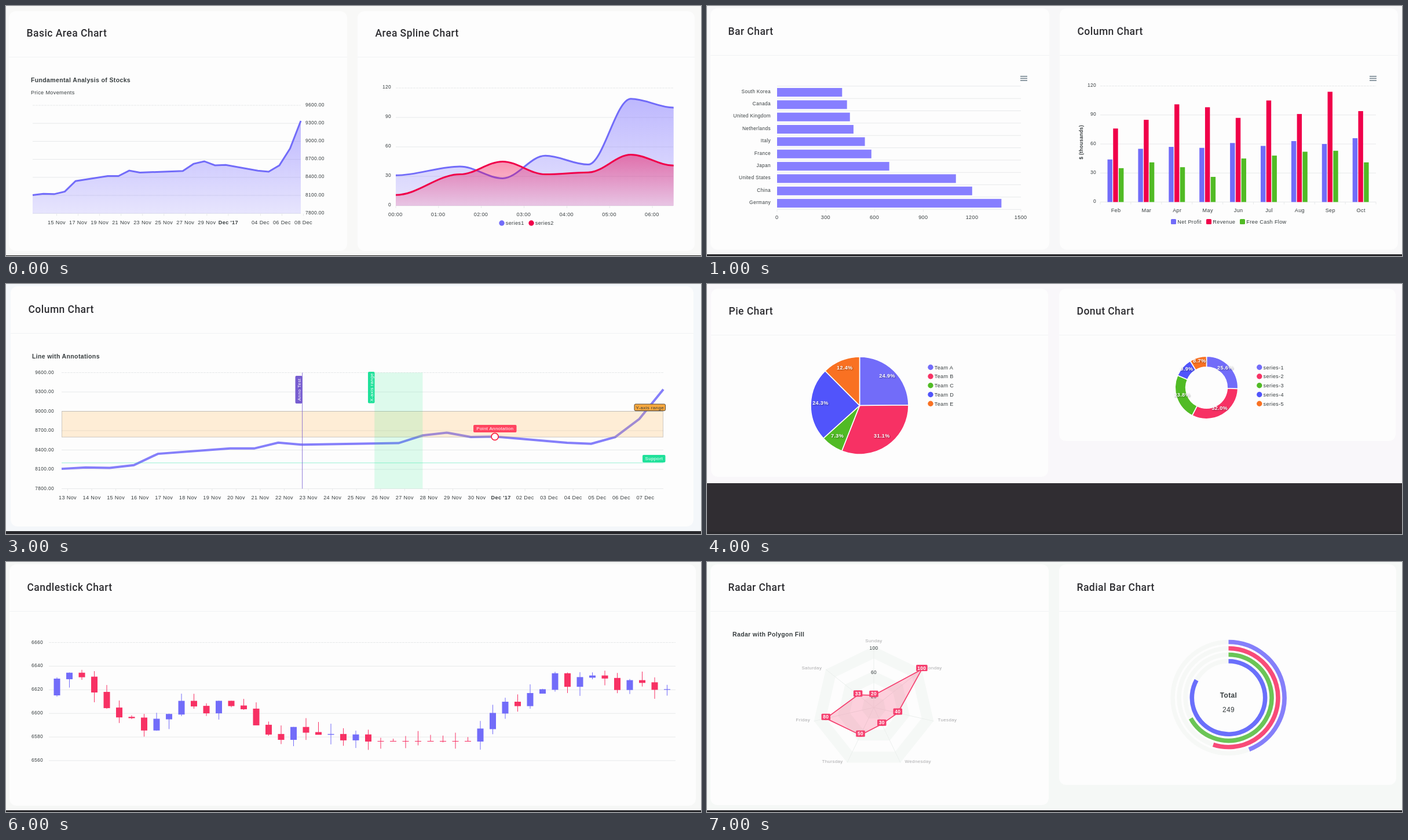
Animation of 1200 by 433 pixels, one loop 8000 ms. Source, as an HTML page:

```html
<!DOCTYPE html>
<html lang="en">
<head>
<meta charset="utf-8">
<title>Chart gallery</title>
<style>
html, body { margin: 0; width: 100%; height: 100%; overflow: hidden; background: #f8f8f7; }
svg { display: block; width: 100%; height: 100%; }
text { font: 8.4px "Liberation Sans", Arial, sans-serif; letter-spacing: .36px; fill: #373d3f; white-space: pre; }
.x { font-size: 9.1px; }
.s { font-size: 8px; }
.b { font-weight: 700; }
.m { text-anchor: middle; }
.e { text-anchor: end; }
.w { fill: #fff; }
.mute { fill: #a9a9ab; }
.sub { font-size: 10.5px; font-weight: 700; }
.big { font-size: 11.9px; }
.title { font: 500 17.5px Roboto, sans-serif; letter-spacing: .45px; fill: #2d2d31; }
.glow { filter: drop-shadow(1px 1px 1px rgba(0, 0, 0, .45)); }
.slide { visibility: hidden; animation: show 8s step-end infinite; animation-delay: calc((var(--i) - 8) * 1s); }
@keyframes show { 0% { visibility: visible; } 12.5%, 100% { visibility: hidden; } }
</style>
</head>
<body>
<svg id="stage" viewBox="0 0 1200 433" preserveAspectRatio="none">
  <defs>
    <linearGradient id="violetFade" x2="0" y2="1">
      <stop stop-color="#7366ff" stop-opacity=".46"/><stop offset="1" stop-color="#7366ff" stop-opacity=".16"/>
    </linearGradient>
    <linearGradient id="redFade" x2="0" y2="1">
      <stop stop-color="#f0004a" stop-opacity=".46"/><stop offset="1" stop-color="#f0004a" stop-opacity=".14"/>
    </linearGradient>
  </defs>
</svg>
<script>
const VIOLET = '#726cf9', RED = '#f0004a', PINK = '#f73164', GREEN = '#51bb25', BLUE = '#5154fb', ORANGE = '#f97122';
const GRID = '#e7e9ea', DARK = '#27272b';

// SVG helpers
const text = (x, y, s, cls = '', extra = '') => `<text x="${x}" y="${y}" class="${cls}" ${extra}>${s}</text>`;
const rect = (x, y, w, h, fill, extra = '') => `<rect x="${x}" y="${y}" width="${w}" height="${h}" fill="${fill}" ${extra}/>`;
const line = (x1, y1, x2, y2, color = GRID, w = 1, extra = '') =>
  `<path d="M${x1} ${y1}L${x2} ${y2}" stroke="${color}" stroke-width="${w}" ${extra}/>`;
const path = (d, fill, stroke = 'none', w = 0, extra = '') =>
  `<path d="${d}" fill="${fill}" stroke="${stroke}" stroke-width="${w}" ${extra}/>`;
const circle = (x, y, r, fill, extra = '') => `<circle cx="${x}" cy="${y}" r="${r}" fill="${fill}" ${extra}/>`;
const upright = (x, y, s, cls) => text(0, 3, s, cls + ' m', `transform="translate(${x} ${y}) rotate(-90)"`);
const each = (list, fn) => list.map(fn).join('');
const range = n => [...Array(n).keys()];
const polar = (cx, cy, r, turn) => [cx + r * Math.sin(turn * 2 * Math.PI), cy - r * Math.cos(turn * 2 * Math.PI)];
const straight = pts => 'M' + pts.map(p => p.join(' ')).join('L');
const smooth = pts => pts.reduce((d, [x, y], i) => {
  if (!i) return `M${x} ${y}`;
  const [px, py] = pts[i - 1], k = (x - px) * .35;
  return `${d}C${px + k} ${py} ${x - k} ${y} ${x} ${y}`;
}, '');
const closeDown = (d, pts, base) => `${d}L${pts.at(-1)[0]} ${base}L${pts[0][0]} ${base}Z`;
const random = seed => () => (seed = seed * 16807 % 2147483647) / 2147483647;

// Shared page parts
const card = (x, y, w, h, title, divider, base) =>
  rect(x, y, w, h, '#fdfdfd', 'rx="12"') + line(x, divider, x + w, divider, '#f1f3f4') + text(x + 30.5, base, title, 'title');
const page = (bg, foot) => rect(0, 0, 1200, 433, bg) + rect(0, foot, 1200, 433 - foot, DARK);
const rows = (x1, x2, top, step, labels, lx, cls, dy) => each(labels, (s, i) => {
  const y = top + i * step;
  return line(x1, y, x2, y, GRID, 1, i ? '' : 'stroke-dasharray="4 1"') + text(lx, y + dy, s, cls);
});
const ticks = (xs, y) => each(xs, x => line(x, y, x, y + 4));
const menu = (x, y) => each([0, 3.6, 7.2], d => line(x, y + d, x + 12, y + d, '#74848f', 1.6));
const dotLegend = (items, y) => each(items, ([x, s, c]) => circle(x, y, 4.7, c) + text(x + 6.8, y + 3.2, s, 'x'));
const squareLegend = (items, y) => each(items, ([x, s, c]) => rect(x, y, 9, 9, c, 'rx="1.5"') + text(x + 11.3, y + 7.6, s, 'x'));
const decimals = ['9600.00', '9300.00', '9000.00', '8700.00', '8400.00', '8100.00', '7800.00'];

// Prices by day, counted from 13 Nov
const prices = [[0, 8107.85], [1, 8128], [2, 8122.9], [3, 8165.5], [4, 8340.7], [7, 8423.7], [8, 8423.5], [9, 8514.3],
  [10, 8481.85], [14, 8506.9], [15, 8626.2], [16, 8668.95], [17, 8602.3], [18, 8607.55], [21, 8512.9], [22, 8496.25],
  [23, 8600.65], [24, 8881.1], [25, 9340.85]];
const pricePoints = (x, step, base, scale) => prices.map(([d, p]) => [x + d * step, base - (p - 7800) * scale]);
const two = n => String(n).padStart(2, '0');
const dayName = d => d === 18 ? "Dec '17" : d < 18 ? `${13 + d} Nov` : `${two(d - 17)} Dec`;
const dayAxis = (days, x, step, y, base) => each(days, d =>
  text(x + d * step, base, dayName(d), 'x m' + (d === 18 ? ' b' : ''))) + ticks(days.map(d => x + d * step), y);

function areaSlide() {
  const pts = pricePoints(46, 18.52, 359.5, .1042), d = straight(pts);
  const spline = (values, color, fill) => {
    const p = values.map((v, i) => [673 + 73.8 * (i && i + .5), 346 - v * 1.7]), s = smooth(p);
    return path(closeDown(s, p, 346), `url(#${fill})`) + path(s, 'none', color, 3);
  };
  return rect(0, 0, 1200, 433, '#f8f8f7') + rect(0, 432, 1200, 1, '#111') +
    card(5, 9, 584, 415, 'Basic Area Chart', 88.5, 53) + card(607, 9, 582, 415, 'Area Spline Chart', 88.5, 53) +
    text(43, 132, 'Fundamental Analysis of Stocks', 'sub') + text(43, 153, 'Price Movements', 'x') +
    rows(46, 509, 172, 31.2, decimals, 517, '', 1.5) +
    path(closeDown(d, pts, 359.5), 'url(#violetFade)') + path(d, 'none', VIOLET, 3) +
    dayAxis([2, 4, 6, 8, 10, 12, 14, 16, 18, 21, 23, 25], 50.5, 18.52, 359.5, 378) +
    rows(673, 1152, 142, 51, [120, 90, 60, 30, 0], 665, 'e', 1) +
    spline([31, 40, 28, 51, 42, 109, 100], VIOLET, 'violetFade') + spline([11, 32, 45, 32, 34, 52, 41], RED, 'redFade') +
    each(range(7), i => text(672.3 + i * 73.85, 364, `0${i}:00`, 'x m')) + ticks(range(7).map(i => 673 + i * 73.85), 346) +
    dotLegend([[856, 'series1', VIOLET], [907, 'series2', RED]], 376);
}

function barSlide() {
  const countries = [['South Korea', 400], ['Canada', 430], ['United Kingdom', 448], ['Netherlands', 470], ['Italy', 540],
    ['France', 580], ['Japan', 690], ['United States', 1100], ['China', 1200], ['Germany', 1380]];
  const sets = [[44, 55, 57, 56, 61, 58, 63, 60, 66], [76, 85, 101, 98, 87, 105, 91, 114, 94], [35, 41, 36, 26, 45, 48, 52, 53, 41]];
  const colors = [VIOLET, RED, GREEN];
  return page('#f7f7f8', 430) +
    card(6, 4, 585, 418, 'Bar Chart', 85.5, 50) + card(609, 4, 584, 418, 'Column Chart', 85.5, 50) +
    menu(541, 121.8) + menu(1144, 121.8) +
    each(range(11), i => line(121, 138.8 + i * 21.35, 542, 138.8 + i * 21.35)) +
    each(countries, ([name, v], i) => rect(121, 142 + i * 21.35, v * .2807, 15, '#877fff') + text(110, 150.5 + i * 21.4, name, 'e')) +
    each(range(6), i => text(120.7 + i * 84.2, 369, i * 300, 'x m')) + ticks(range(6).map(i => 121 + i * 84.2), 352.5) +
    rows(679, 1155, 138.5, 50.25, [120, 90, 60, 30, 0], 672, 'e', 1.5) +
    ticks(range(10).map(i => 679 + i * 52.9), 339.5) + upright(646, 236, '$ (thousands)', 'b') +
    each(sets, (set, k) => each(set, (v, i) =>
      rect(691.5 + k * 9.75 + i * 52.9, 339.5 - v * 1.675, 8.4, v * 1.675, colors[k]))) +
    each(['Feb', 'Mar', 'Apr', 'May', 'Jun', 'Jul', 'Aug', 'Sep', 'Oct'], (s, i) => text(706 + i * 52.9, 357, s, 'x m')) +
    squareLegend([[801, 'Net Profit', VIOLET], [862, 'Revenue', RED], [920, 'Free Cash Flow', GREEN]], 369);
}

function stepSlide() {
  const rnd = random(41), steps = [34, 44, 54, 21, 12, 43, 33, 23, 66, 66, 58];
  const d = steps.reduce((s, v, i) => `${s}${i ? 'H' + (679 + i * 47.5) + 'V' : 'M679 '}${339.5 - v * 2.5}`, '');
  return page('#f6f7f8', 430) +
    card(6, 4, 585, 418, 'Bubble Chart', 80.5, 43) + card(609, 4, 584, 418, 'Stepline Chart', 80.5, 43) +
    rows(66, 542, 138.5, 50.25, [80, 60, 40, 20, 0], 58, 'e', 1.5) +
    each([VIOLET, RED, GREEN], c => each(range(9), () =>
      circle(90 + rnd() * 430, 170 + rnd() * 140, 6 + rnd() * 12, c, 'opacity=".8"'))) +
    rows(679, 1155, 138.5, 50.25, [80, 60, 40, 20, 0], 672, 'e', 1.5) + path(d, 'none', VIOLET, 3) +
    each(range(11), i => text(679 + i * 47.5, 357, i + 1, 'x m'));
}

function annotationSlide() {
  const x = day => 96 + day * 41.56, y = price => 354.5 - (price - 7800) * .11167;
  const tag = (l, t, w, h, s, fill, cls = 'w', extra = '') =>
    rect(l, t, w, h, fill, 'rx="2" ' + extra) + text(l + w / 2, t + h / 2 + 2.8, s, 's m ' + cls);
  return page('#f4f7fa', 428) + card(8, 4, 1179, 416, 'Column Chart', 85.5, 50) +
    text(45, 128.5, 'Line with Annotations', 'sub') + rows(96, 1135, 153.5, 33.5, decimals, 83, 'e', 2) +
    path(straight(pricePoints(96, 41.56, 354.5, .11167)), 'none', '#857ffa', 4) +
    dayAxis(range(25), 106.5, 41.56, 354.5, 373) +
    rect(96.5, y(9000), 1038, y(8600) - y(9000), '#feb04a', 'fill-opacity=".22" stroke="#777" stroke-opacity=".35"') +
    line(96, y(8200), 1135, y(8200), '#00e396', 1, 'opacity=".4"') +
    rect(x(13), 153.5, x(15) - x(13), 201, '#22e68a', 'opacity=".14"') +
    line(x(10), 153.5, x(10), 354.5, '#775dd0', 1, 'opacity=".8"') +
    rect(499.5, 159, 12, 48, '#775dd0', 'rx="2"') + upright(505.7, 183, 'Anno Test', 's w') +
    rect(625, 152, 11.5, 54.5, '#20e19a', 'rx="2"') + upright(631, 179, 'X-axis range', 's w') +
    tag(1085, 208, 53.5, 11.5, 'Y-axis range', '#f8a83e', '', 'stroke="#55493a"') +
    tag(1099, 296, 39.5, 13, 'Support', '#20e19a') +
    tag(807, 244, 74.5, 13, 'Point Annotation', '#ff4560') +
    circle(x(18), y(8607), 6, '#fff', 'stroke="#fa2440" stroke-width="1.7"');
}

function pieSlide() {
  const colors = [VIOLET, PINK, GREEN, BLUE, ORANGE];
  const ring = (cx, cy, outer, inner, labelR, values) => {
    const total = values.reduce((a, b) => a + b);
    let from = 0, shapes = '', labels = '';
    values.forEach((v, i) => {
      const share = v / total, to = from + share, big = +(share > .5);
      const back = inner ? `L${polar(cx, cy, inner, to)}A${inner} ${inner} 0 ${big} 0 ${polar(cx, cy, inner, from)}` : `L${cx} ${cy}`;
      shapes += path(`M${polar(cx, cy, outer, from)}A${outer} ${outer} 0 ${big} 1 ${polar(cx, cy, outer, to)}${back}Z`, colors[i], '#fff', 1.6);
      const [lx, ly] = polar(cx, cy, labelR, from + share / 2);
      labels += text(lx, ly, (share * 100).toFixed(1) + '%', 'x m b w glow');
      from = to;
    });
    return shapes + labels;
  };
  const legend = (x, names) => each(names, (s, i) => dotLegend([[x, s, colors[i]]], 144.3 + i * 15.75));
  return rect(0, 0, 1200, 433, '#f9f7fa') + rect(0, 345, 1200, 88, '#302d32') + rect(0, 429, 1200, 4, '#2a292d') +
    card(7, 8, 582, 326, 'Pie Chart', 88.5, 52.5) + card(608, 8, 581, 264, 'Donut Chart', 88.5, 52.5) +
    ring(263.5, 210.5, 84.5, 0, 67.6, [44, 55, 13, 43, 22]) + legend(386, ['A', 'B', 'C', 'D', 'E'].map(s => 'Team ' + s)) +
    ring(862.5, 179.5, 54.2, 35.8, 45, [44, 55, 41, 17, 15]) + legend(953.8, range(5).map(i => `series-${i + 1}`));
}

function mixedSlide() {
  const days = [0, 31, 59, 90, 120, 151, 181, 212, 243, 273, 304], x = i => 111.6 + days[i] * 3.3125;
  const points = values => values.map((v, i) => [x(i), 344 - v * 3.05]);
  const area = points([44, 55, 41, 67, 22, 43, 21, 41, 56, 27, 43]), d = smooth(area);
  const names = ['2003', ...['Feb', 'Mar', 'Apr', 'May', 'Jun', 'Jul', 'Aug', 'Sep', 'Oct', 'Nov'].map(m => m + " '03")];
  return page('#f6f6f6', 430) + card(6, 6, 1185, 416, 'Mixed Chart', 87.5, 51) +
    rows(74, 1156, 139.7, 20.43, [67, 60, 54, 47, 40, 34, 27, 20, 13, 7, 0], 64, 'e', 2) + upright(43.5, 239, 'Points', 'b') +
    path(closeDown(d, area, 344), GREEN, 'none', 0, 'opacity=".25"') + path(d, 'none', '#62bf42', 1.6) +
    each(points([23, 11, 22, 27, 13, 22, 37, 21, 44, 22, 30]), ([cx, y]) => rect(cx - 23.2, y, 46.4, 344 - y, '#776fff', 'opacity=".89"')) +
    path(smooth(points([30, 25, 36, 30, 45, 35, 64, 52, 59, 36, 39])), 'none', PINK, 3.8) +
    each(names, (s, i) => text(x(i) + 3.2, 362, s, 'x m' + (i ? '' : ' b'))) + ticks(range(11).map(i => x(i) + 3.2), 344) +
    dotLegend([[542, 'Column', VIOLET], [594, 'Area', GREEN], [634, 'Line', PINK]], 373.5);
}

function candleSlide() {
  const rnd = random(77);
  let open = 230;
  return page('#f6f7f6', 430) + card(6, 4, 1185, 418, 'Candlestick Chart', 85.5, 50) +
    rows(74, 1156, 139.5, 40.9, [6660, 6640, 6620, 6600, 6580, 6560], 64, 'e', 2) +
    each(range(50), i => {
      const cx = 88 + i * 21.5, close = Math.min(310, Math.max(175, open + (rnd() - .5) * 56));
      const top = Math.min(open, close), low = Math.max(open, close), color = close < open ? VIOLET : PINK;
      open = close;
      return line(cx, top - rnd() * 18, cx, low + rnd() * 18, color) + rect(cx - 5.5, top, 11, low - top + 1, color);
    });
}

function radarSlide() {
  const cx = 288, cy = 252, values = [20, 100, 40, 30, 50, 80, 33];
  const corner = (r, i) => polar(cx, cy, r, i / 7);
  const polygon = radius => straight(range(7).map(i => corner(radius(i), i))) + 'Z';
  const names = [['Sunday', 288, 139.3, 'm'], ['Monday', 375, 186.3], ['Tuesday', 398.5, 276], ['Wednesday', 341.5, 348],
    ['Thursday', 234.7, 348, 'e'], ['Friday', 178, 276, 'e'], ['Saturday', 198.3, 186.3, 'e']];
  const arcs = [[96.5, .44, '#857ffa'], [85.5, .55, '#f84b78'], [74.5, .67, '#6bc556'], [63.2, .83, '#6a6ffb']];
  return page('#f5f8f6', 430) +
    card(6, 4, 584, 417, 'Radar Chart', 85.5, 50) + card(608, 4, 582, 382, 'Radial Bar Chart', 85.5, 50) +
    text(44, 129, 'Radar with Polygon Fill', 'sub') +
    each(range(5), k => path(polygon(() => 106 - k * 21.2), k % 2 ? '#fdfdfd' : '#f5f8f6')) +
    each(range(7), i => line(cx, cy, ...corner(106, i), '#ebefed')) +
    each(names, ([s, x, y, cls = '']) => text(x, y, s, 's mute ' + cls)) +
    each([100, 60, 20], (v, i) => text(cx, 152 + i * 42.2, v, 'm')) +
    path(polygon(i => values[i] * 1.06), '#f73164', '#f5406f', 1.7, 'fill-opacity=".22" stroke-linejoin="round"') +
    each(values, (v, i) => {
      const [x, y] = corner(v * 1.06, i), w = v > 99 ? 19.5 : 15.5;
      return circle(x, y, 3, '#f5406f') + rect(x - w / 2, y - 8, w, 11, '#f5406f', 'rx="1.5"') + text(x, y + .6, v, 'm b w');
    }) +
    each(arcs, ([r, share, color]) => circle(900.5, 235, r, 'none', 'stroke="#f6f8f6" stroke-width="7.5"') +
      path(`M900.5 ${235 - r}A${r} ${r} 0 ${+(share > .5)} 1 ${polar(900.5, 235, r, share)}`, 'none', color, 7.6)) +
    text(900.5, 235.2, 'Total', 'big m b') + text(900.5, 259.5, 249, 'big m');
}

const slides = [areaSlide, barSlide, stepSlide, annotationSlide, pieSlide, mixedSlide, candleSlide, radarSlide];
document.getElementById('stage').innerHTML += each(slides, (draw, i) => `<g class="slide" style="--i:${i}">${draw()}</g>`);
</script>
</body>
</html>
```
